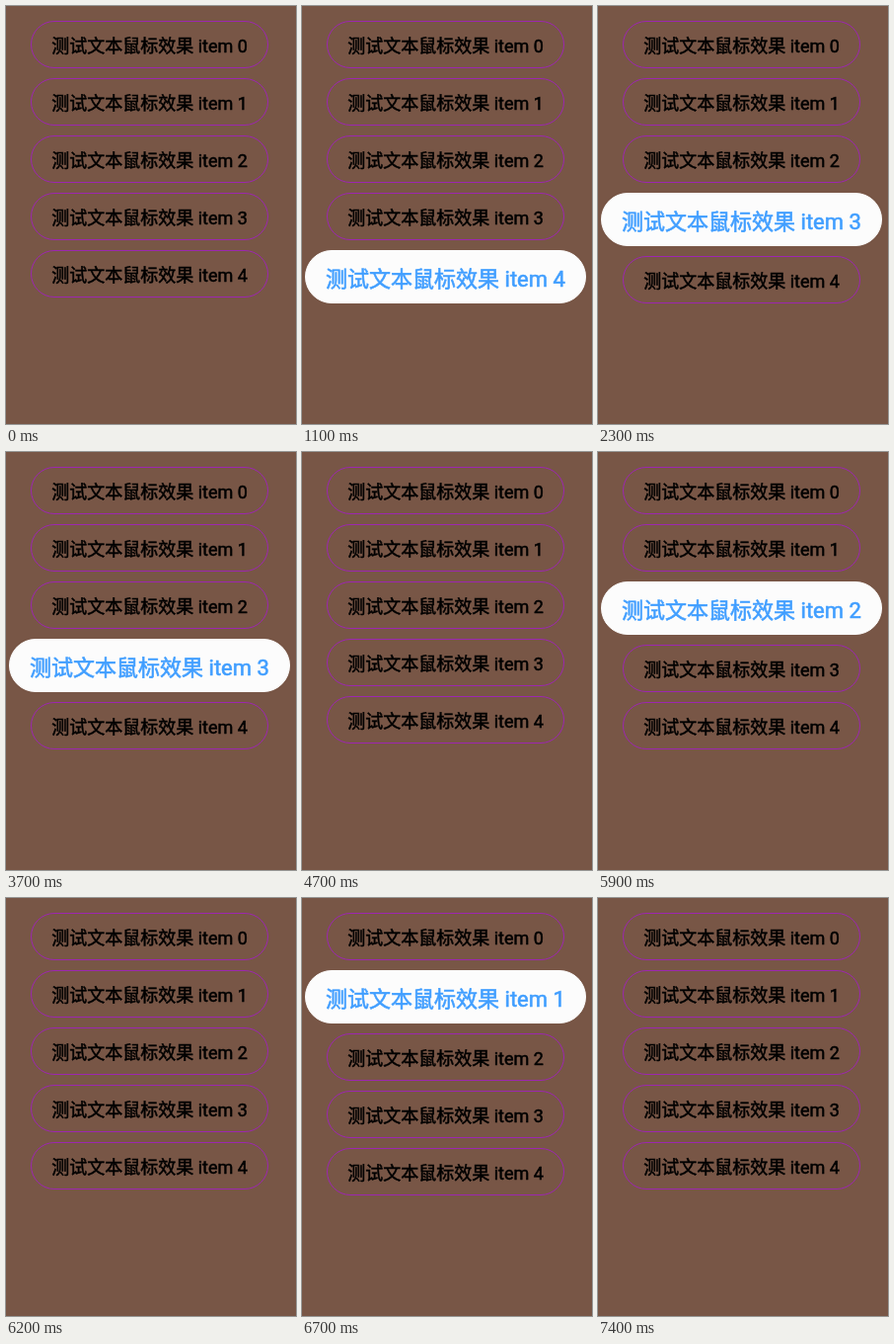
Animation, 294 px wide and 423 px high, one loop 8 s. Source, as an HTML page:

```html
<!DOCTYPE html>
<html lang="zh">
<head>
<meta charset="utf-8">
<style>
  html, body { margin: 0; width: 100%; height: 100%; overflow: hidden; background: #785646; }
  svg { display: block; }
  text {
    font: 18px Roboto, "Noto Sans CJK SC", "Noto Sans CJK", sans-serif;
    text-anchor: middle; stroke: #000; stroke-width: .5px;
  }
  rect { fill: none; stroke: #9c27b0; }
  .on text { font-size: 22px; fill: #409eff; stroke: #409eff; stroke-width: .6px; }
  .on rect { fill: #fcfcfc; stroke: #fcfcfc; }
</style>
</head>
<body>
<svg width="294" height="423"></svg>
<script>
const LOOP = 8000, TICK = 100, COUNT = 5, GAP = 10;
const BODY = 0.96; // share of each row that reacts to the pointer

// Pointer path: [tick, height in rows]; it leaves the list after the last point.
const path = [
  [0, 5.87], [27, 3.6], [34, 4.4], [50, 1.42], [55, 3.45], [58, 3.05], [60, 1.7], [64, 0.25], [74, 3.2]
];

const svg = document.querySelector('svg');
svg.innerHTML = Array.from({ length: COUNT }, (_, i) =>
  `<g><rect/><text x="145.5">测试文本鼠标效果 item ${i}</text></g>`).join('');
const items = [...svg.children];

function setAttrs(el, attrs) {
  for (const name in attrs) el.setAttribute(name, attrs[name]);
}

function hoveredAt(tick) {
  const next = path.findIndex(([end]) => end > tick);
  if (next < 0) return -1;
  const [t0, y0] = path[next - 1], [t1, y1] = path[next];
  const row = y0 + (y1 - y0) * (tick - t0) / (t1 - t0);
  return row % 1 < BODY ? Math.floor(row) : -1;
}

function show(hovered) {
  let y = 15;
  items.forEach((item, i) => {
    const on = i === hovered;
    const [x, width, height] = on ? [3, 285, 54] : [25, 241, 48];
    const [box, label] = item.children;
    setAttrs(item, { class: on ? 'on' : '', transform: `translate(0 ${y})` });
    setAttrs(box, { x: x + 0.5, y: 0.5, width: width - 1, height: height - 1, rx: (height - 1) / 2 });
    setAttrs(label, { y: on ? 37 : 32 });
    y += height + GAP;
  });
}

const start = performance.now();
function frame() {
  const t = (performance.now() - start) % LOOP;
  show(hoveredAt(Math.floor(t / TICK)));
  requestAnimationFrame(frame);
}
frame();
</script>
</body>
</html>
```
